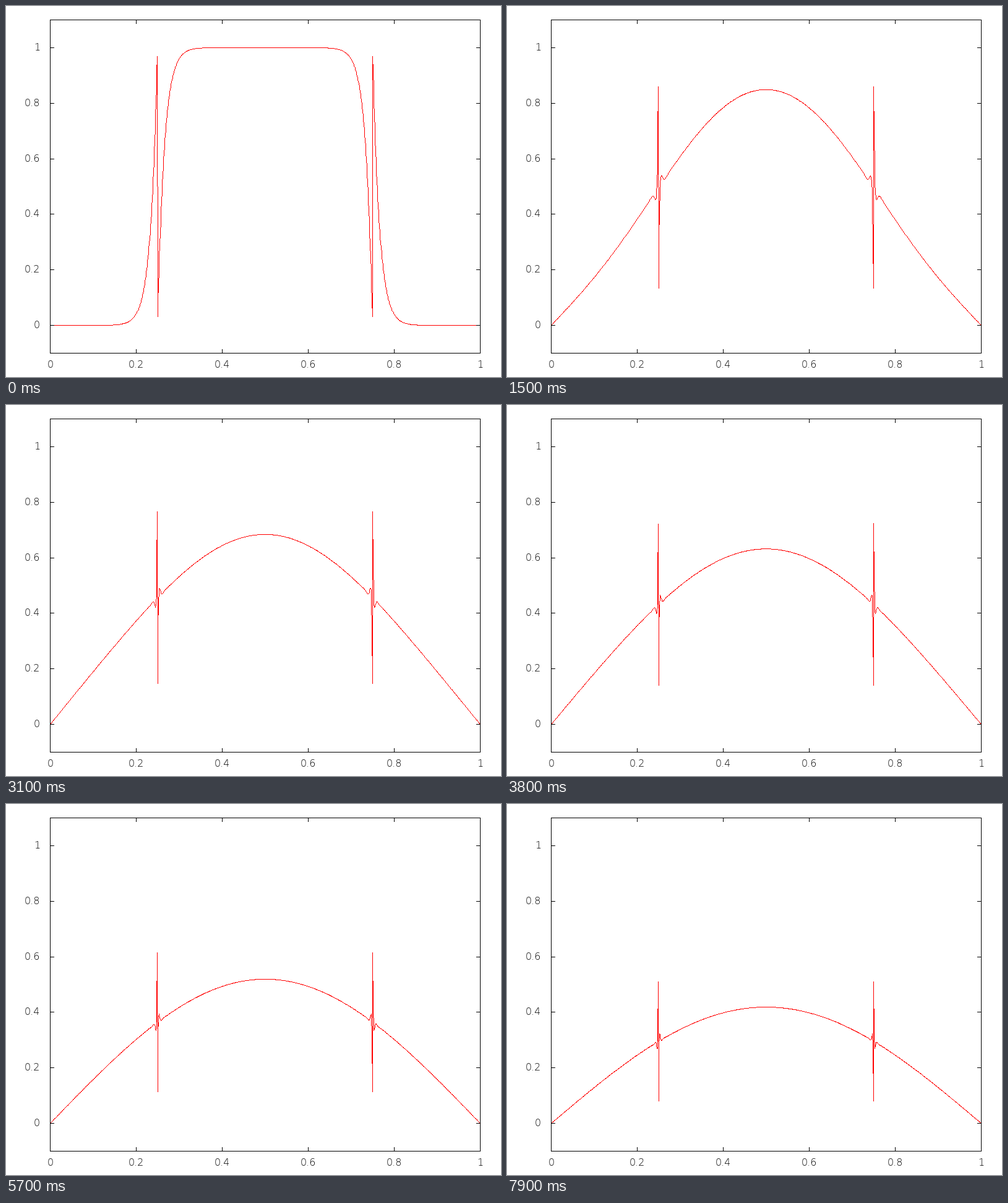
A matplotlib script that plays this animation: 800x600 px, repeating every 8 s.

```python
import matplotlib.pyplot as plt
import numpy as np
from matplotlib.animation import FuncAnimation

W, H, DPI = 800, 600, 100
LEFT, RIGHT, TOP, BOTTOM = 71, 766, 22, 561
TICK = 6
FRAMES, INTERVAL = 80, 100
RED, BLACK = (255, 0, 0), (0, 0, 0)

# Heat equation on [0, 1], Crank-Nicolson, solved in the discrete sine basis
N = 1024
DT = 1 / 2048
idx = np.arange(1, N)
sines = np.sin(np.pi * (np.outer(idx, idx) % (2 * N)) / N)
start = ((idx >= N // 4) & (idx < 3 * N // 4)).astype(float)
coeffs = 2 / N * sines @ start
stiff = DT / 2 * N**2 * 4 * np.sin(np.pi * idx / (2 * N)) ** 2
gain = (1 - stiff) / (1 + stiff)


def solution(steps):
    u = np.zeros(N + 1)
    u[1:-1] = sines @ (coeffs * gain**steps)
    return u


def to_px(x):
    return np.floor(LEFT + (RIGHT - LEFT) * x + 0.5).astype(int)


def to_py(y):
    up = (y + 0.1) / 1.2 * (BOTTOM - TOP)
    return BOTTOM - np.floor(up + 0.5).astype(int)


def draw_curve(img, px, py):
    """Aliased one-pixel polyline."""
    for x0, y0, x1, y1 in zip(px[:-1], py[:-1], px[1:], py[1:]):
        n = max(abs(x1 - x0), abs(y1 - y0))
        t = np.arange(n + 1) / max(n, 1)
        cols = np.floor(x0 + (x1 - x0) * t + 0.5).astype(int)
        rows = np.floor(y0 + (y1 - y0) * t + 0.5).astype(int)
        img[rows, cols] = RED


def draw_axes(img):
    img[[TOP, BOTTOM], LEFT:RIGHT + 1] = BLACK
    img[TOP:BOTTOM + 1, [LEFT, RIGHT]] = BLACK
    for x in to_px(ticks):
        img[TOP:TOP + TICK + 1, x] = BLACK
        img[BOTTOM - TICK:BOTTOM + 1, x] = BLACK
    for y in to_py(ticks):
        img[y, LEFT:LEFT + TICK + 1] = BLACK
        img[y, RIGHT - TICK:RIGHT + 1] = BLACK


ticks = np.arange(6) / 5
grid_px = to_px(np.arange(N + 1) / N)


def render(frame):
    img = np.full((H, W, 3), 255, np.uint8)
    draw_curve(img, grid_px, to_py(solution(2 * frame + 1)))
    draw_axes(img)
    return img


fig = plt.figure(figsize=(W / DPI, H / DPI), dpi=DPI, facecolor="white")
stage = fig.figimage(render(0), origin="upper")


def label(x, y, text, ha):
    fig.text(x / W, 1 - y / H, text, ha=ha, va="baseline", color="black",
             family="DejaVu Sans", weight=200, size=16 * 72 / DPI)


for value, x, y in zip(ticks, to_px(ticks), to_py(ticks)):
    label(x + 0.5, 585, f"{value:g}", "center")
    label(55, y + 5, f"{value:g}", "right")


def update(frame):
    stage.set_data(render(frame))
    return [stage]


anim = FuncAnimation(fig, update, frames=FRAMES, interval=INTERVAL,
                     repeat=True, repeat_delay=0, blit=False)
plt.show()
```
